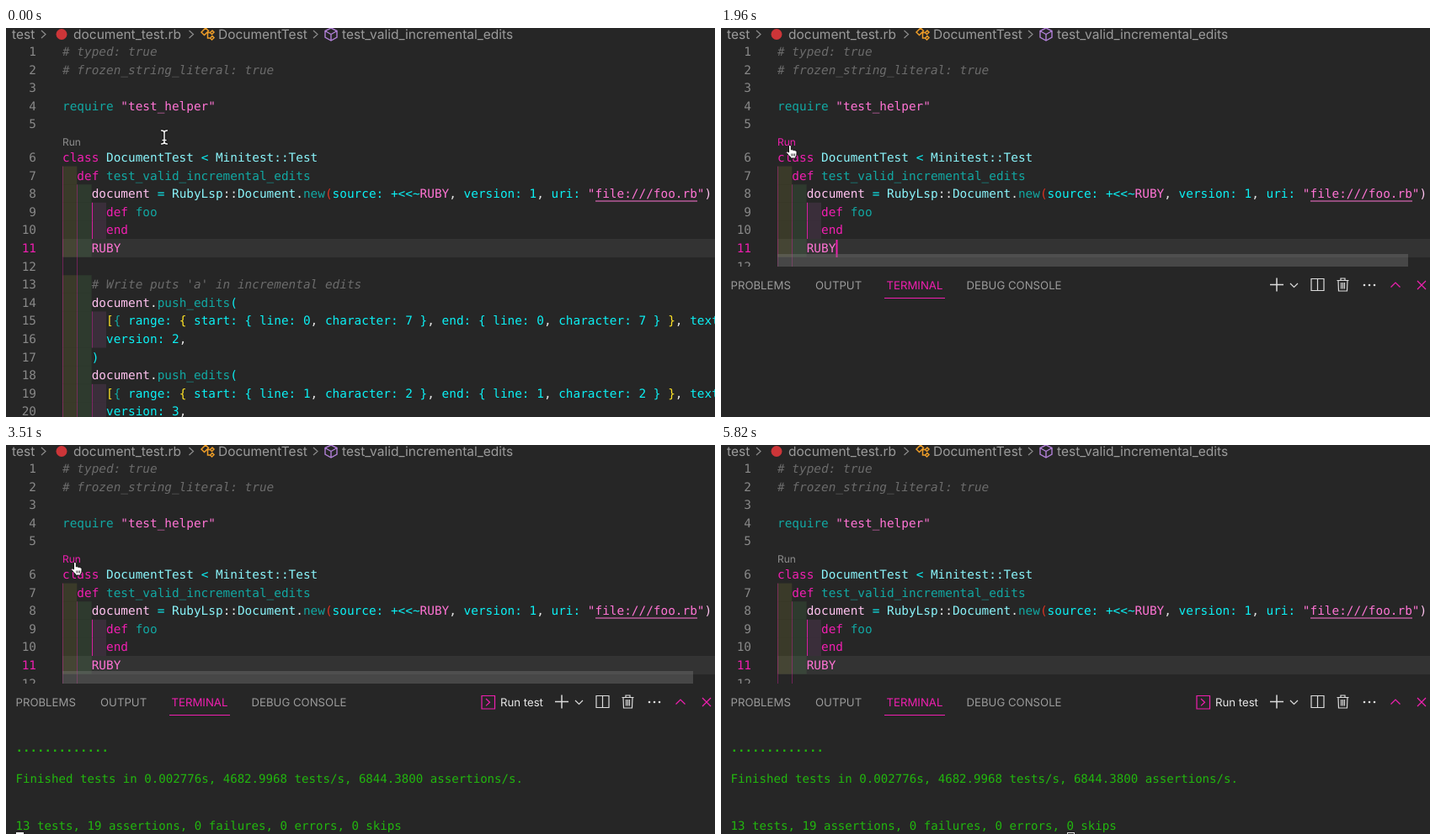
Animation of 842x463 px, one loop 5.87 s. Source, as an HTML page:

```html
<!DOCTYPE html>
<html lang="en">
<head>
<meta charset="utf-8">
<title>Running a test from the editor</title>
<style>
  html, body { margin: 0; width: 100%; height: 100%; overflow: hidden; background: #262626; }
  svg { display: block; width: 842px; height: 463px; }
  text { white-space: pre; text-rendering: geometricPrecision; }
  .code, .term { font-family: 'DejaVu Sans Mono', monospace; }
  .code { font-size: 14.4px; }
  .term { font-size: 14.1px; }
  .ui { font-family: Inter, 'Open Sans', sans-serif; font-size: 13.2px; fill: #9b9b9b; }
  .crumb { font-size: 15.5px; }
  .line { fill: none; stroke: #dcdcdc; stroke-width: 1.2; }
  .pink { stroke: #f01fb0; }
</style>
</head>
<body>
<svg viewBox="0 0 842 463">
  <rect width="842" height="463" fill="#262626"/>
  <g class="ui crumb">
    <text x="7" y="13">test</text>
    <text x="80" y="13">document_test.rb</text>
    <text x="252" y="13">DocumentTest</text>
    <text x="399" y="13">test_valid_incremental_edits</text>
  </g>
  <path class="line" style="stroke:#8c8c8c" d="M42 3l5 4.5-5 4.5M217.5 3l5 4.5-5 4.5M365 3l5 4.5-5 4.5"/>
  <circle cx="66" cy="7.5" r="6.5" fill="#cc3538"/>
  <path class="line" style="stroke:#ee9d28;stroke-width:1.5" d="M232 5l5-5 3.500 3.500-5 5zM238 5.500h5M239.500 5.500v6.500h3.500M242.500 5.500l2.500-2.500 2 2-2.500 2.500zM242.500 12l2.500-2.500 2 2-2.500 2.500z"/>
  <path class="line" style="stroke:#b180d7;stroke-width:1.4" d="M386 0l7 3.500v7.500l-7 4-7-4V3.500zM379 3.500l7 4 7-4M386 7.500V15"/>

  <g id="editor" class="code"></g>
  <text id="run" class="ui" x="67" y="139.500" style="font-size:12px">Run</text>
  <rect data-on="430-960 1430-2020" x="136.500" y="252" width="2" height="21" fill="#f01fb0"/>

  <g data-on="1960-5870">
    <rect id="scrollbar" x="67" y="269" width="749" height="15" fill="#797979" fill-opacity=".4"/>
    <rect y="284" width="842" height="179" fill="#262626"/>
    <g class="ui">
      <text x="11.500" y="311">PROBLEMS</text>
      <text x="112" y="311">OUTPUT</text>
      <text x="196.500" y="311" fill="#f01fb0">TERMINAL</text>
      <text x="291.500" y="311">DEBUG CONSOLE</text>
    </g>
    <rect x="194" y="321" width="72" height="1" fill="#f01fb0"/>
    <path class="line" style="stroke-width:1.500" d="M660 297.500v16M652 305.500h16"/>
    <path class="line" d="M676 304l4.500 4.500 4.500-4.500"/>
    <path class="line" d="M701 298.500h15v14h-15zM708.500 298.500v14"/>
    <path class="line" d="M731.500 300.500h14M736 300.500v-2.500h5v2.500M733 300.500l.500 12.500h10l.500-12.500M736.500 303v7.500M738.500 303v7.500M740.500 303v7.500"/>
    <g fill="#dcdcdc"><circle cx="764" cy="306" r="1.300"/><circle cx="770" cy="306" r="1.300"/><circle cx="776" cy="306" r="1.300"/></g>
    <path class="line pink" d="M795.500 308.500l5.500-5.500 5.500 5.500M827 301l10 10M837 301l-10 10"/>
    <g data-on="2080-5870">
      <path class="line pink" d="M565 298.500h15.500v15.500H565zM570 302l4.500 4.200-4.500 4.200"/>
      <text class="ui" x="587" y="311" style="fill:#e8e8e8">Run test</text>
    </g>
    <g id="terminal" class="term"></g>
    <rect id="cursor"/>
  </g>

  <g id="beam" fill="none" stroke-linecap="round">
    <path stroke="#111" stroke-width="3.200" d="M-3.500-8Q0-8 0-5.500V5.500Q0 8-3.500 8M3.500-8Q0-8 0-5.500M0 5.500Q0 8 3.500 8M-2 3.500h4"/>
    <path stroke="#f4f4f4" stroke-width="1.500" d="M-3.500-8Q0-8 0-5.500V5.500Q0 8-3.500 8M3.500-8Q0-8 0-5.500M0 5.500Q0 8 3.500 8M-2 3.500h4"/>
  </g>
  <g id="hand" stroke="#111" stroke-linejoin="round">
    <path fill="#fff" d="M-1.500 9V1.800a1.400 1.400 0 0 1 2.800 0V6q1.600-1 2.400.4 1.500-.8 2.200.5 2-.6 2.100 1.400V11q0 2-1.300 3.500V16H.5v-1.200Q-2 12.500-4.200 9.400-4.700 7.600-3 7.800z"/>
    <path fill="none" stroke-width=".8" d="M1.800 10.500v3M3.700 10.500v3M5.500 10.500v3"/>
  </g>
  <path id="arrow" fill="#0a0a0a" stroke="#fff" stroke-width="1.100" d="M0 0V14.500L3.400 11.400 5.600 16.500 8 15.500 5.800 10.600H10.400z"/>
</svg>
<script>
const LOOP = 5870, PINK = '#f01fb0';
const $ = id => document.getElementById(id);

const COLORS = {
  k: PINK, f: '#12a8a3', c: '#8af4fa', v: '#ffc2ef', a: '#0cf0f4', s: '#ff74d4',
  y: '#ffe326', r: '#dd3322', g: '#6b6b6b', w: '#e6e6e6', b: '#2492ff', d: '#9c9c9c', t: '#22b70e'
};

// "§" starts a run; the next character is its colour key.
const spans = marked => marked.split('§').map(run => run &&
  `<tspan fill="${COLORS[run[0]]}">${run.slice(1).replace(/</g, '&lt;')}</tspan>`).join('');
const text = (x, y, marked, attrs = '') => `<text x="${x}" y="${y}" ${attrs}>${spans(marked)}</text>`;
const rect = (x, y, w, h, fill) => `<rect x="${x}" y="${y}" width="${w}" height="${h}" fill="${fill}"/>`;

// Editor
const pushEdit = (line, char) => {
  const point = close => `§aline: ${line}§w, §acharacter: ${char} }`;
  return `      §y[§f{ §arange: §y{ §astart: { ${point()}§w, §aend: { ${point()} §y}§w, §atext: `;
};
const indent = (n, marked) => '§w' + ' '.repeat(n) + marked.trimStart();
const code = [
  '§g# typed: true',
  '§g# frozen_string_literal: true',
  '',
  '§frequire §s"test_helper"',
  '',
  '§kclass §cDocumentTest §a< §cMinitest::Test',
  indent(2, '§kdef §ftest_valid_incremental_edits'),
  indent(4, '§vdocument §a= §cRubyLsp§w::§cDocument§w.§fnew§r(§asource: +<<~§sRUBY§w, §aversion: 1§w, §auri: §s"file:///foo.rb"§v)'),
  indent(6, '§kdef §ffoo'),
  indent(6, '§kend'),
  indent(4, '§sRUBY'),
  '',
  indent(4, "§g# Write puts 'a' in incremental edits"),
  indent(4, '§vdocument§w.§fpush_edits§a('),
  indent(6, pushEdit(0, 7)),
  indent(6, '§aversion: 2§w,'),
  indent(4, '§a)'),
  indent(4, '§vdocument§w.§fpush_edits§a('),
  indent(6, pushEdit(1, 2)),
  indent(6, '§aversion: 3§w,')
];
const LEFT = 67, TAB = 17.34, ROW = 21.6;
const TINTS = ['rgba(255,255,64,.09)', 'rgba(127,255,127,.09)', 'rgba(255,127,255,.09)'];
const baseline = n => n < 6 ? 33 + ROW * (n - 1) : 159 + ROW * (n - 6);

let editor = rect(LEFT, 251, 775, 22, '#333');
code.forEach((marked, i) => {
  const n = i + 1, y = baseline(n), top = y - 16;
  const depth = n < 7 || n === 12 ? 0 : marked.match(/^§w( *)/)[1].length / 2;
  const guides = n === 12 ? 2 : depth;
  for (let d = 0; d < guides; d++) {
    const x = LEFT + d * TAB;
    if (d < depth) editor += rect(x, top, TAB, ROW, TINTS[d]);
    const active = d === 2 && n < 11;
    editor += rect(Math.round(x), top, 1, ROW, `rgba(240,31,176,${active ? .85 : .36})`);
  }
  editor += `<text x="36" y="${y}" text-anchor="end" fill="${n === 11 ? PINK : '#898989'}">${n}</text>`;
  editor += text(LEFT, y, marked, n < 3 || n === 13 ? 'font-style="italic"' : '');
});
$('editor').innerHTML = editor + rect(700, 205.5, 121, 1, COLORS.s);

// Terminal
const TERM_X = 11.6, TERM_ROW = 18.5, CELL = 8.489;
const user = 'corinhalverne', prompt = `${user}@Corins-Workbook-Lab-2 ruby-lsp % `;
const command = `ruby -Itest /Users/${user}/src/github.com/Shopify/ruby-lsp/test/document_test.rb`;
const wrap = 96 - prompt.length;
const out = (row, marked, attrs, col = 0) =>
  text(TERM_X + col * CELL, 346.5 + row * TERM_ROW, marked, attrs);
const during = (span, body) => `<g data-on="${span}">${body}</g>`;

$('terminal').innerHTML =
  during('2200-3510', out(0, '§w' + command)) +
  during('2400-3510',
    out(1, '§bactivated §dshadowenv §b(ruby:3.2.1)', 'font-weight="bold"') + out(2, '§w' + prompt) +
    '<circle cx="0" cy="378.500" r="4.500" fill="none" stroke="#777" stroke-width="1.300"/>') +
  during('2460-3510',
    out(2, '§w' + command.slice(0, wrap), '', prompt.length) + out(3, '§w' + command.slice(wrap))) +
  during('3510-5870',
    out(1, '§t' + '.'.repeat(13), 'font-weight="bold"') +
    out(3, '§tFinished tests in 0.002776s, 4682.9968 tests/s, 6844.3800 assertions/s.') +
    out(6, '§t13 tests, 19 assertions, 0 failures, 0 errors, 0 skips'));

// Time, row, column
const cursorStops = [[2020, 0, 0], [2200, 1, 0], [2400, 2, 47], [2460, 4, 0], [3510, 7, 0], [3570, 7, 47]];
// Time, x, y of the pointing finger
const handStops = [[570, 76, 134], [810, 76.5, 135], [870, 77, 136], [960, 77, 139], [1020, 77, 142],
  [1200, 81, 141], [1370, 81.5, 139.5], [1430, 82, 139]];

const latest = (stops, t) => stops.filter(s => s[0] <= t).pop();
const clamp = v => Math.min(1, Math.max(0, v));
const mix = (a, b, p) => a + (b - a) * p;
const stepped = (t, from, to, count) => clamp(Math.floor((t - from) / (to - from) * count) / count);

function pointer(t) {
  if (t < 570) {
    const p = t < 80 ? 0 : stepped(t + 54, 80, 624, 10);
    const e = 1 - (1 - p) ** 2, x = mix(188, 76, e);
    return [x < 93 ? 'hand' : 'beam', x, mix(130, 134, e)];
  }
  if (t < 4530) return ['hand', ...latest(handStops, t).slice(1)];
  if (t >= 5160) return ['none', 0, 0];
  const p = stepped(t, 4530, 5100, 11), e = p * p * (3 - 2 * p);
  return ['arrow', mix(86.5, 743, e), mix(141, 461.5, e)];
}

const timed = [...document.querySelectorAll('[data-on]')].map(el =>
  [el, el.dataset.on.split(' ').map(span => span.split('-').map(Number))]);
const show = (el, on) => el.setAttribute('visibility', on ? 'inherit' : 'hidden');
const set = (el, attrs) => Object.entries(attrs).forEach(([k, v]) => el.setAttribute(k, v));

function draw() {
  const t = performance.now() % LOOP;
  for (const [el, ranges] of timed) show(el, ranges.some(([a, b]) => t >= a && t < b));

  const [kind, x, y] = pointer(t);
  for (const id of ['beam', 'hand', 'arrow']) {
    show($(id), id === kind);
    $(id).setAttribute('transform', `translate(${x} ${y})`);
  }
  $('run').style.fill = kind === 'hand' || kind === 'arrow' && x < 90 ? PINK : '#8e8e8e';
  $('scrollbar').setAttribute('opacity', 1 - clamp((t - 4600) / 500));

  const stop = latest(cursorStops, t);
  show($('cursor'), false);
  if (stop) {
    const hollow = t >= 5820, inset = hollow ? .5 : 0;
    set($('cursor'), {
      x: Math.round(TERM_X + stop[2] * CELL) + inset,
      y: Math.floor(332 + stop[1] * TERM_ROW) + inset,
      width: 9 - 2 * inset, height: 18 - 2 * inset,
      fill: hollow ? 'none' : '#fff', stroke: hollow ? '#ddd' : 'none', visibility: 'inherit'
    });
  }
  requestAnimationFrame(draw);
}
draw();
</script>
</body>
</html>
```
